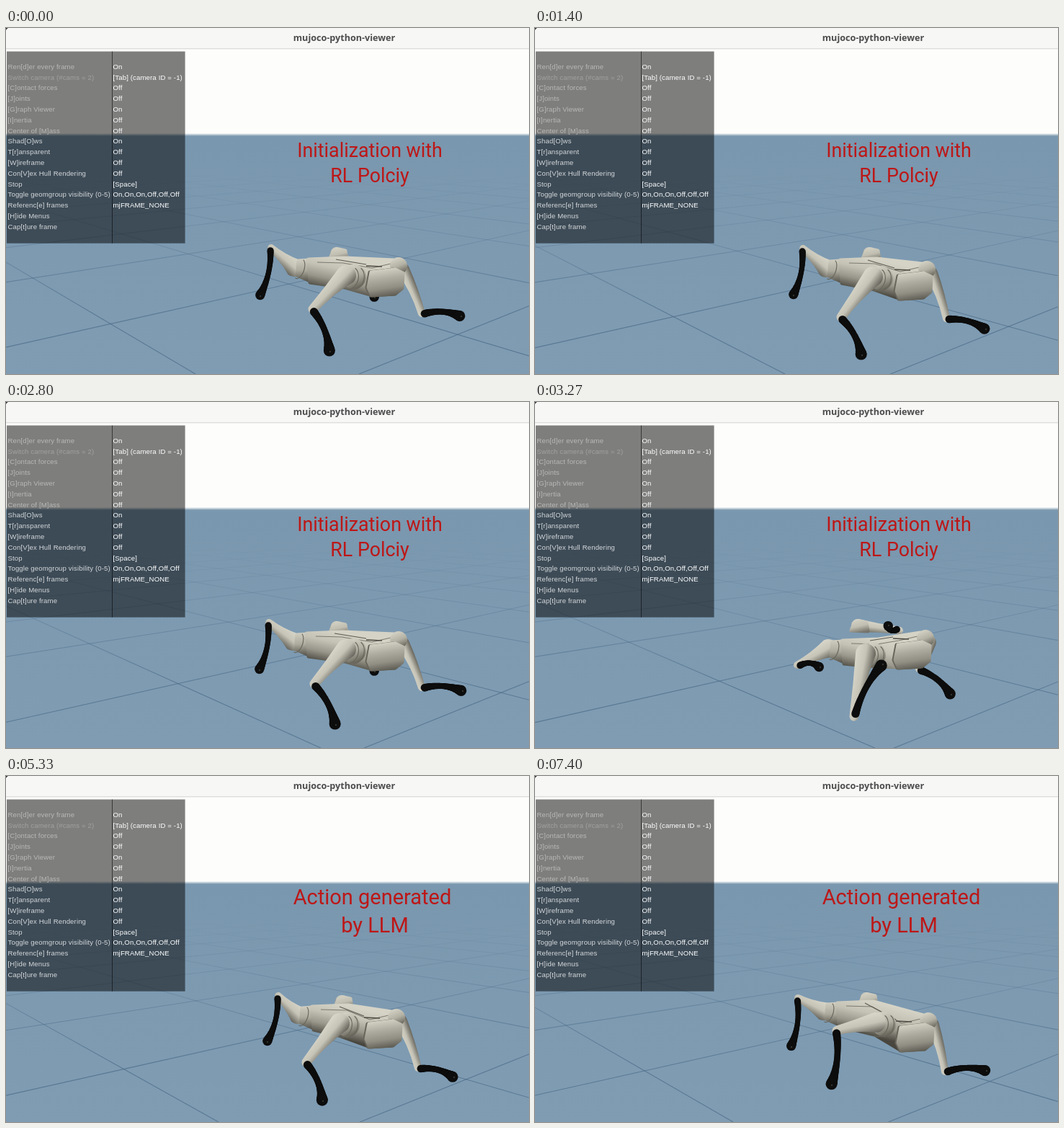
An HTML page with a canvas that plays this animation: 726 by 480 pixels, repeating every 8 s.

```html
<!DOCTYPE html>
<html lang="en">
<head>
<meta charset="utf-8">
<title>mujoco-python-viewer</title>
<style>
html, body { margin: 0; width: 726px; height: 480px; overflow: hidden; background: #fdfdfb; }
canvas, svg { position: absolute; left: 0; top: 0; width: 726px; height: 480px; }
.title { font: 700 12.6px "Open Sans", "Noto Sans", sans-serif; fill: #4c4c4c; text-anchor: middle; }
.menu text { font: 9.6px "Liberation Sans", Arial, sans-serif; letter-spacing: .13px; fill: #fff; }
.label { font-family: Roboto, sans-serif; font-weight: 400; fill: #bd1717; text-anchor: middle; }
</style>
</head>
<body>
<canvas id="stage" width="726" height="480"></canvas>
<svg viewBox="0 0 726 480">
  <rect width="726" height="28" fill="#f7f7f6"/>
  <rect y="28" width="726" height="1.4" fill="#dededb"/>
  <path d="M0 0H3Q1 1 0 3Z" fill="#333"/>
  <text class="title" x="469.5" y="17.7">mujoco-python-viewer</text>
  <g class="menu" id="menu">
    <rect x="1" y="32.5" width="247.6" height="266.2" fill="#000" opacity=".5"/>
    <rect x="147" y="32.5" width="1" height="266.2" fill="#000" opacity=".55"/>
  </g>
  <g class="label" id="first" font-size="26.8">
    <text x="505" y="179">Initialization with</text>
    <text x="505" y="214">RL Polciy</text>
  </g>
  <g class="label" id="second" font-size="29">
    <text x="508.5" y="177.5">Action generated</text>
    <text x="512" y="217">by LLM</text>
  </g>
</svg>
<script>
const LOOP = 8000, STEP = 200 / 3, CUT = 4130, HORIZON = 148;
const ctx = document.getElementById('stage').getContext('2d');
const first = document.getElementById('first'), second = document.getElementById('second');

const rows = [
  ['Ren[d]er every frame', 'On'], ['Switch camera (#cams = 2)', '[Tab] (camera ID = -1)'],
  ['[C]ontact forces', 'Off'], ['[J]oints', 'Off'], ['[G]raph Viewer', 'On'], ['[I]nertia', 'Off'],
  ['Center of [M]ass', 'Off'], ['Shad[O]ws', 'On'], ['T[r]ansparent', 'Off'], ['[W]ireframe', 'Off'],
  ['Con[V]ex Hull Rendering', 'Off'], ['Stop', '[Space]'],
  ['Toggle geomgroup visibility (0-5)', 'On,On,On,Off,Off,Off'],
  ['Referenc[e] frames', 'mjFRAME_NONE'], ['[H]ide Menus', ''], ['Cap[t]ure frame', '']
];
function addText(str, x, y, opacity) {
  const el = document.createElementNS('http://www.w3.org/2000/svg', 'text');
  el.setAttribute('x', x);
  el.setAttribute('y', y);
  el.setAttribute('fill-opacity', opacity);
  el.textContent = str;
  document.getElementById('menu').append(el);
}
rows.forEach(([name, value], i) => {
  const y = 56.7 + i * 14.8;
  addText(name, 2.5, y, i === 1 ? .28 : i < 7 ? .45 : .78);
  addText(value, 148.5, y, 1);
});

// Each leg is hip, knee, foot: l = left, n = near, r = right, k = far.
const walk = {
  l: [400, 332, 368, 305, 352, 372], n: [481, 347, 426, 390, 449, 449],
  r: [546, 330, 577, 396, 631, 400], k: [459, 313, 500, 345, 511, 374]
};
const walkLow = {
  l: [404, 333, 372, 306, 358, 371], n: [478, 349, 425, 401, 453, 454],
  r: [545, 335, 571, 403, 625, 418], k: [464, 313, 500, 345, 508, 370]
};
const walkFar = { ...walk, l: [398, 332, 365, 306, 351, 372], n: [481, 347, 428, 391, 457, 448], r: [546, 330, 577, 396, 633, 401] };
const fold = {
  l: [407, 342, 364, 365, 395, 368], n: [468, 353, 443, 436, 482, 364],
  r: [543, 328, 533, 370, 577, 406], k: [448, 310, 506, 317, 490, 310]
};
const crouch = {
  l: [405, 357, 376, 353, 394, 387], n: [465, 358, 459, 434, 502, 463],
  r: [535, 329, 577, 375, 621, 373], k: [467, 332, 520, 384, 550, 377]
};
const stand = { ...walkLow, l: [405, 331, 378, 305, 362, 369], n: [472, 347, 417, 397, 439, 451], r: [543, 335, 572, 405, 621, 418], k: [466, 313, 500, 345, 508, 370] };
const paw = {
  l: [400, 326, 365, 308, 355, 376], n: [482, 346, 419, 353, 411, 429],
  r: [547, 340, 569, 410, 626, 409], k: [460, 309, 500, 345, 508, 370]
};
const mix = (a, b, u) => a + (b - a) * u;
function blend(p, q, u) {
  const out = {};
  for (const leg in p) out[leg] = p[leg].map((v, i) => mix(v, q[leg][i], u));
  return out;
}
const half = blend(stand, paw, .4), most = blend(stand, paw, .55);
// time, pose, floor shift
const keys = [
  [0, walk, 263], [350, crouch, 284], [700, walkLow, 305], [1050, fold, 326], [1400, walkLow, 347],
  [1800, crouch, 347], [2267, fold, 347], [2800, walkFar, 437], [3270, fold, 472], [3733, crouch, 508],
  [3933, walkFar, 515], [4129, walkFar, 515], [CUT, blend(stand, walk, .2), 292], [4333, stand, 295],
  [5333, stand, 295], [5667, half, 290], [5930, half, 290], [6067, most, 287], [6999, most, 287],
  [7400, paw, 275], [LOOP, paw, 275]
];

function poly(pts, fill) {
  ctx.beginPath();
  pts.forEach(([x, y], i) => i ? ctx.lineTo(x, y) : ctx.moveTo(x, y));
  ctx.closePath();
  ctx.fillStyle = ctx.strokeStyle = fill;
  ctx.lineWidth = 5;
  ctx.lineJoin = 'round';
  ctx.fill();
  ctx.stroke();
}
function line(pts, color, width) {
  ctx.beginPath();
  pts.forEach(([x, y], i) => i ? ctx.lineTo(x, y) : ctx.moveTo(x, y));
  ctx.strokeStyle = color;
  ctx.lineWidth = width;
  ctx.stroke();
}
function ramp(x0, y0, x1, y1, ...colors) {
  const g = ctx.createLinearGradient(x0, y0, x1, y1);
  colors.forEach((c, i) => g.addColorStop(i / (colors.length - 1), c));
  return g;
}
function disc(x, y, r, fill) {
  ctx.beginPath();
  ctx.arc(x, y, r, 0, 7);
  ctx.fillStyle = fill;
  ctx.fill();
}
function motor(x, y, r) {
  disc(x, y, r, ramp(x - r * .4, y - r, x + r * .4, y + r, '#d6d4c7', '#b3b1a4', '#5d5b51'));
}
function ring(x, y, rx, ry) {
  ctx.beginPath();
  ctx.ellipse(x, y, rx, ry, .3, -1.3, 1.8);
  ctx.strokeStyle = '#68665c';
  ctx.lineWidth = 1.1;
  ctx.stroke();
}
// A bowed, tapering upper leg; bow pushes its middle to the side.
function thigh([x0, y0, x1, y1], r0, r1, bow = 0) {
  const a = Math.atan2(y1 - y0, x1 - x0), nx = -Math.sin(a), ny = Math.cos(a);
  const w = nx + ny > 0 ? r0 : -r0;
  const mx = mix(x0, x1, .5) + nx * bow, my = mix(y0, y1, .5) + ny * bow, m = r1 * 1.1;
  ctx.beginPath();
  ctx.arc(x0, y0, r0, a + Math.PI / 2, a - Math.PI / 2);
  ctx.quadraticCurveTo(mx - nx * m, my - ny * m, x1 - nx * r1, y1 - ny * r1);
  ctx.arc(x1, y1, r1, a - Math.PI / 2, a + Math.PI / 2);
  ctx.quadraticCurveTo(mx + nx * m, my + ny * m, x0 + nx * r0, y0 + ny * r0);
  ctx.fillStyle = ramp(x0 - nx * w, y0 - ny * w, x0 + nx * w, y0 + ny * w, '#d9d7ca', '#c6c4b7', '#65635a');
  ctx.fill();
}
function shank([, , x0, y0, x1, y1], foot) {
  const len = Math.hypot(x1 - x0, y1 - y0) || 1, ux = (x1 - x0) / len, uy = (y1 - y0) / len;
  for (let u = 0; u <= 1; u += .025) {
    const bend = 18 * u * (1 - u), r = foot * (.66 - .16 * Math.sin(Math.PI * u) + .34 * u ** 5);
    disc(mix(x0 + ux * 4, x1, u) + uy * bend, mix(y0 + uy * 4, y1, u) - ux * bend, r, '#0d0d0d');
  }
  disc(x1 + 1, y1, 1.2, '#34342f');
}

function drawRobot({ l, n, r, k }) {
  const at = (p, dx, dy) => [p[0] + dx, p[1] + dy];
  thigh(k, 9, 5);
  shank(k, 7);
  poly([at(k, -5, -3), at(k, 3, -6), at(k, 12, -4), at(k, 14, 8), at(k, -9, 7)],
    ramp(k[0], k[1] - 8, k[0] + 4, k[1] + 10, '#d2d0c3', '#c0beb1', '#75736a'));
  thigh([r[0] + 5, r[1] + 5, r[2], r[3]], 9, 5, -4);
  shank(r, 8);
  thigh(l, 13, 5);
  shank(l, 7);
  const [lx, ly] = l, [rx, ry] = r, [nx, ny] = n;
  poly([at(l, 6, -9), at(l, 20, -10), at(l, 20, 18), at(l, 4, 11)],
    ramp(lx, ly - 12, lx, ly + 20, '#d0cec1', '#adab9e', '#55534a'));
  poly([at(l, 20, -11), at(l, 70, -13), at(r, -8, -8), at(r, 2, 0), at(r, 2, 32),
    at(r, -40, 40), at(n, -10, 13), at(l, 22, 21)],
    ramp(lx + 60, ly - 14, lx + 50, ly + 32, '#d5d3c6', '#c4c2b5', '#98968a', '#48463e'));
  line([at(l, 32, -7), at(l, 68, -6), at(r, -38, 3), at(r, -12, -3)], '#7d7b70', 1.2);
  line([at(l, 58, -11), at(r, -46, -2)], '#5d5b52', 1.2);
  line([at(r, -46, 0), at(r, -24, 1)], '#4c4a42', 1.6);
  ring(lx + 7, ly + 2, 7, 14);
  motor(rx - 1, ry, 12);
  const box = [at(r, -39, 9), at(r, -6, 5), at(r, 5, 10), at(r, 4, 31), at(r, -6, 39), at(r, -38, 41), at(r, -43, 30)];
  poly(box.map(p => at(p, -2, 0)), '#67655b');
  poly(box, ramp(rx - 20, ry + 4, rx - 14, ry + 44, '#d2d0c3', '#aeaca0', '#918f84', '#56544b'));
  motor(nx + 2, ny - 2, 17);
  ring(nx + 4, ny, 12, 16);
  ring(nx - 4, ny, 12, 16);
  thigh([nx - 9, ny - 4, n[2], n[3]], 14, 6.5, 2);
  shank(n, 8.5);
}

// Parallel ground lines meeting at one point on the horizon.
function fan(vx, base, gap) {
  const tint = ramp(0, HORIZON + 50, 0, 400, 'rgba(75,104,134,0)', 'rgba(75,104,134,.3)', 'rgba(75,104,134,.7)');
  for (let i = -1; i < 9; i++) line([[vx, HORIZON], [base + gap * i, 480]], tint, 1.1);
}
function drawFloor(shift) {
  ctx.fillStyle = '#fdfdfb';
  ctx.fillRect(0, 0, 726, 480);
  ctx.fillStyle = ramp(0, HORIZON, 0, 480, '#7997ae', '#7d9ab1', '#7f9cb3');
  ctx.fillRect(0, HORIZON, 726, 480);
  ctx.fillStyle = ramp(0, HORIZON - 2, 0, HORIZON + 2, '#fdfdfb', '#7997ae');
  ctx.fillRect(0, HORIZON - 2, 726, 4);
  fan(-300, shift, 547);
  fan(1320, -166 + (shift - 263) * .04, -656);
}

function draw(now) {
  const t = Math.floor((now % LOOP + 5) / STEP) * STEP % LOOP;
  const i = Math.max(1, keys.findIndex(key => key[0] > t));
  const [t0, p0, s0] = keys[i - 1], [t1, p1, s1] = keys[i];
  const u = (t - t0) / (t1 - t0);
  drawFloor(mix(s0, s1, u));
  drawRobot(blend(p0, p1, (1 - Math.cos(Math.PI * u)) / 2));
  first.style.display = t < CUT ? '' : 'none';
  second.style.display = t < CUT ? 'none' : '';
}
const start = performance.now();
function frame() {
  draw(performance.now() - start);
  requestAnimationFrame(frame);
}
frame();
</script>
</body>
</html>
```
